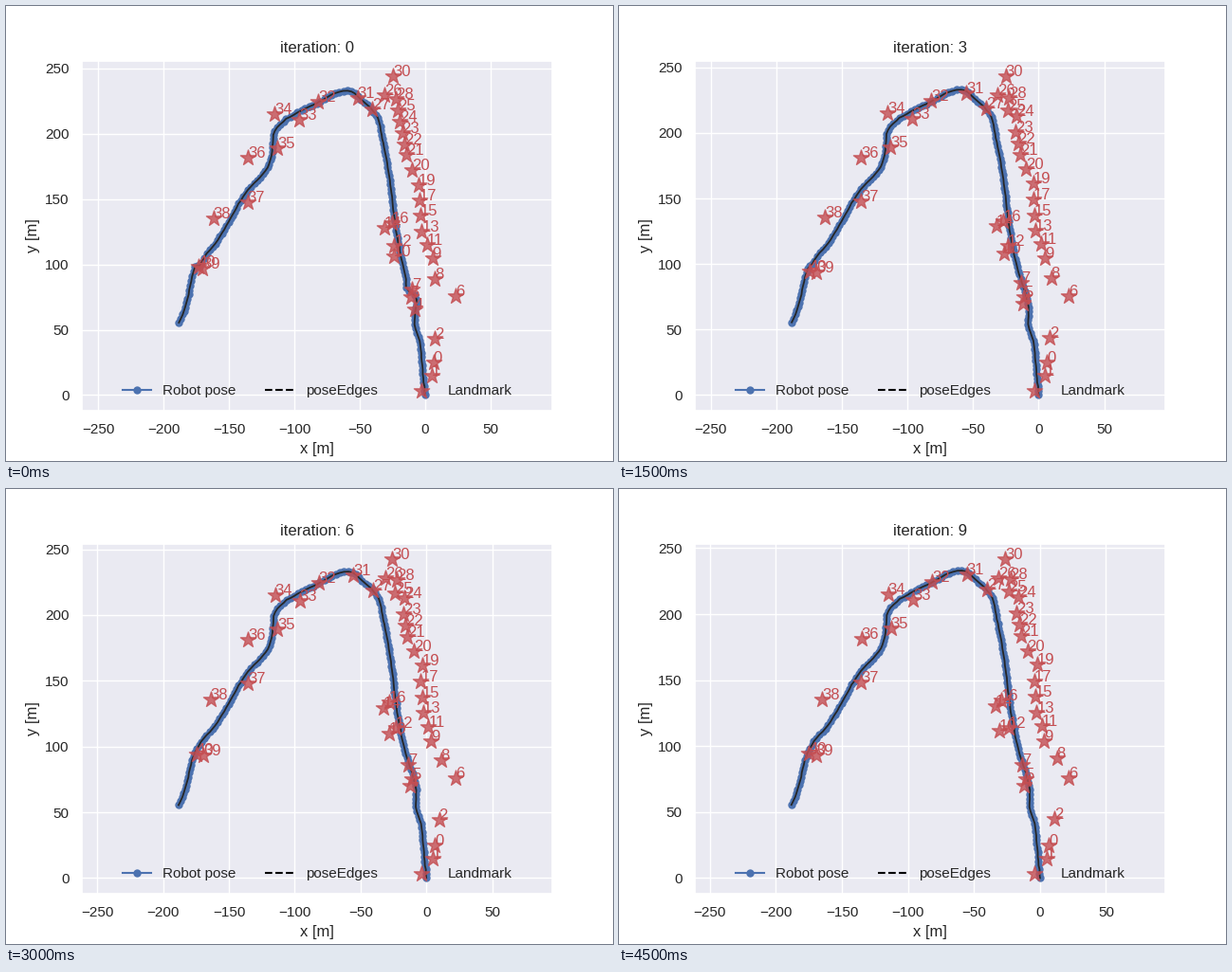
Write a matplotlib script that moves like this. It is 640 by 480 pixels and loops after 5 s.

```python
import numpy as np
import matplotlib.pyplot as plt
from matplotlib.animation import FuncAnimation

BLUE, RED, INK = "#4c72b0", "#c44e52", "#262626"
STEPS = 10

plt.rcParams.update({
    "font.family": "Liberation Sans", "font.size": 12,
    "axes.facecolor": "#eaeaf2", "axes.edgecolor": "white",
    "axes.linewidth": 1.25, "axes.grid": True, "axes.axisbelow": True,
    "axes.labelsize": 12, "axes.titlesize": 12, "axes.labelcolor": INK,
    "text.color": INK, "grid.color": "white", "grid.linewidth": 1,
    "xtick.color": INK, "ytick.color": INK,
    "xtick.labelsize": 11, "ytick.labelsize": 11,
    "xtick.major.size": 6, "ytick.major.size": 6,
    "xtick.bottom": False, "ytick.left": False,
    "legend.fontsize": 11, "legend.frameon": False,
})

# Turning points of the drive, joined by a smooth curve
ROUTE = np.array([
    (0, 0), (-1.8, 20), (-4.3, 42), (-7.5, 52), (-8, 69), (-11.5, 82),
    (-16.3, 97), (-20.8, 119), (-26, 157), (-28.8, 177), (-33, 197),
    (-37.5, 215), (-47, 224.5), (-58, 233), (-67, 231.8), (-81, 224.5),
    (-96, 217), (-110, 208), (-115, 202), (-116.8, 189), (-119.5, 176),
    (-135.5, 157), (-163, 113), (-172.5, 102), (-178.5, 88), (-183.2, 68),
    (-188.3, 55.5)])

# Landmarks scattered around the route
MARKS = {
    0: (6.5, 25), 1: (5, 14.5), 2: (7.3, 43), 4: (-8, 65.6), 5: (-10.9, 75),
    6: (23.2, 75.8), 7: (-10.2, 81), 8: (7.8, 88.5), 10: (-24, 106),
    12: (-23.5, 114), 14: (-31.2, 128), 16: (-25.5, 132), 26: (-31.2, 229.8),
    27: (-40.3, 219), 30: (-24.5, 243.9), 31: (-51.5, 227.6),
    32: (-81.9, 224.5), 33: (-96.3, 210.5), 34: (-115, 215.1),
    35: (-113, 189.2), 36: (-135.3, 181.5), 37: (-135.7, 148),
    38: (-162, 135.5), 39: (-170.2, 97), 40: (-173.4, 98)}

# A row of landmarks on the right, evenly spaced between a few of them
ROW = [9, 11, 13, 15, 17, 19, 20, 21, 22, 23, 24, 25, 28]
ROW_AT = [0, 2, 5, 7, 12]
row = np.arange(len(ROW))
MARKS.update(zip(ROW, zip(
    np.interp(row, ROW_AT, [5.8, -2.5, -5, -14.2, -22.5]),
    np.interp(row, ROW_AT, [104.5, 125.5, 161, 183.6, 226.5]))))

# Total correction of a landmark: steady over the run, or quick to settle
STEADY = {2: (3.6, 2), 6: (-1.4, 0), 8: (5, 2), 9: (-3, -1), 10: (-6.7, 6),
          14: (-2.3, 2.3), 16: (-4, 2.5), 19: (3, 1), 30: (-1.9, -2.5),
          26: (0, -2.3), 38: (-3, 0)}
QUICK = {4: (-4.3, 4.5), 7: (-3.5, 5), 24: (2.5, 3.5), 25: (-3, -1),
         31: (-4, 2.6), 39: (.6, -4), 40: (-1.5, -3.8)}


def spline(p):
    d = np.r_[0, np.cumsum(np.hypot(*np.diff(p, axis=0).T))]
    slope = np.gradient(p, d, axis=0)
    s = np.linspace(0, d[-1], 150)
    i = np.clip(np.searchsorted(d, s, "right") - 1, 0, len(p) - 2)
    h = (d[i + 1] - d[i])[:, None]
    f = (s - d[i])[:, None] / h
    return (p[i] * (1 + 2 * f) * (1 - f) ** 2 + p[i + 1] * f * f * (3 - 2 * f)
            + h * f * (1 - f) * (slope[i] * (1 - f) - slope[i + 1] * f))


PATH = spline(ROUTE)
PATH[1:-1] += np.random.default_rng(4).normal(0, .15, (len(PATH) - 2, 2))


def kink(v, center, width):
    u = (v - center) / width
    return np.tanh(2 * u) * np.exp(-u * u / 2)


def poses_at(step):
    """Two kinks in the route are ironed out as the solver goes on."""
    x, y = PATH.T
    head = np.where(x > -50, kink(y, 78, 6), 0) * max(0, 1 - step / 3)
    tail = np.where(y < 120, kink(x, -174, 3), 0) * max(0, 1 - step / 5)
    return x - 4 * head, y - 4 * tail


def marks_at(step):
    steady, quick = step / (STEPS - 1), 1 - .4 ** step
    still = (0, 0)
    return np.array([
        np.array(p) + steady * np.array(STEADY.get(n, still))
        + quick * np.array(QUICK.get(n, still)) for n, p in MARKS.items()])


fig, ax = plt.subplots(figsize=(6.4, 4.8), dpi=100)


def draw(step):
    ax.clear()
    x, y = poses_at(step)
    ax.plot(x, y, "-o", color=BLUE, ms=5, label="Robot pose")
    ax.plot(x, y, color=INK, lw=1.3)
    ax.plot([], [], "k--", label="poseEdges")
    stars = marks_at(step)
    ax.scatter(*stars.T, s=150, marker="*", color=RED, alpha=.8, zorder=2.5,
               label="Landmark")
    for n, (u, v) in zip(MARKS, stars):
        ax.text(u, v, str(n), color=RED)
    ax.axis("equal")
    ax.set(xlabel="x [m]", ylabel="y [m]", title=f"iteration: {step}")
    ax.legend(loc="lower center", ncol=3)


anim = FuncAnimation(fig, draw, frames=STEPS, init_func=lambda: draw(0),
                     interval=500, repeat=True, repeat_delay=0)
plt.show()
```
